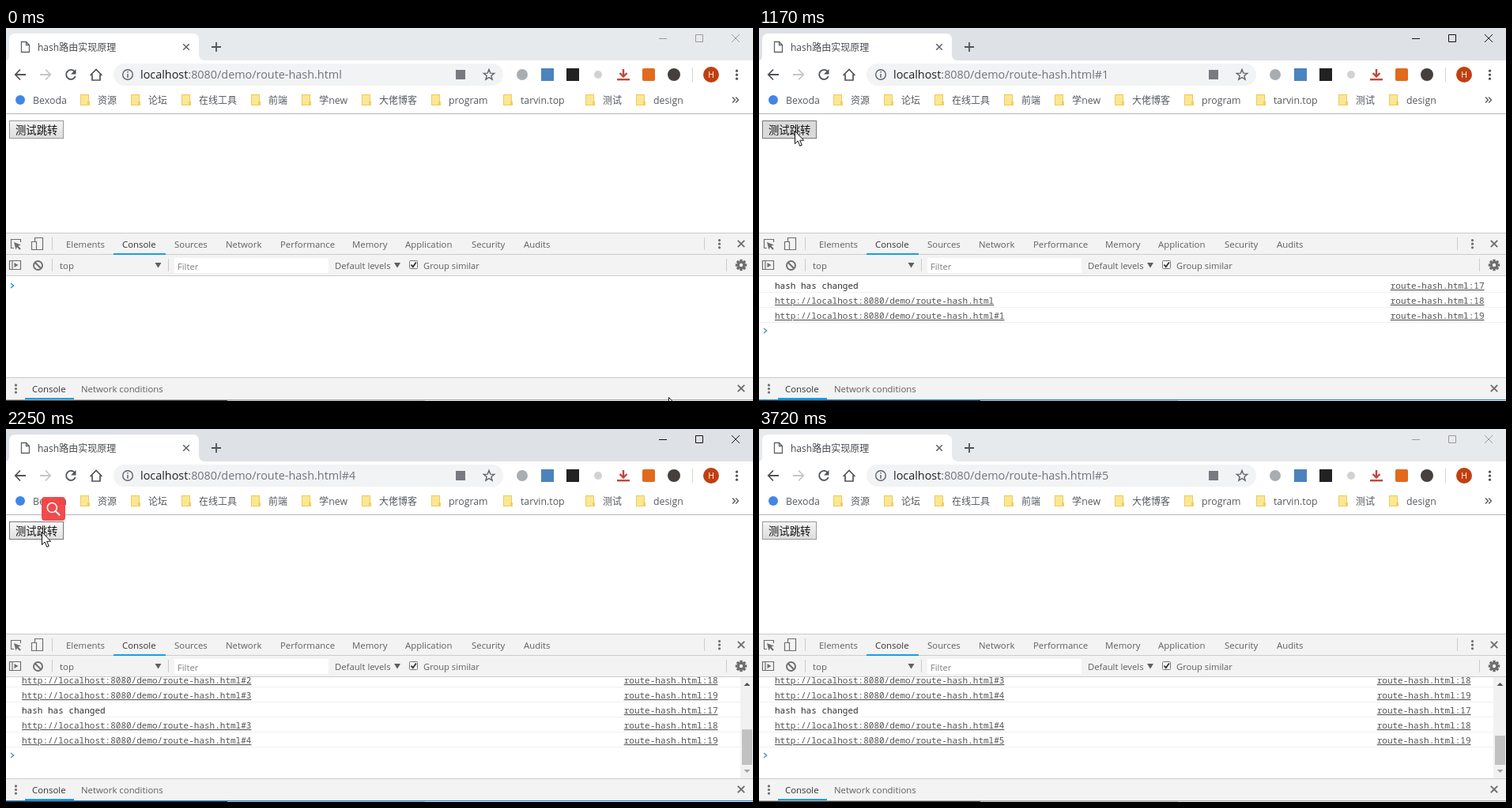
Recreate the animation shown at these times as an HTML page. Size 945 px wide and 472 px high, loop 3800 ms.

```html
<!DOCTYPE html>
<html lang="zh">
<head>
<meta charset="utf-8">
<title>hash</title>
<style>
html, body { margin: 0; width: 100%; height: 100%; overflow: hidden; background: #fff; }
svg { display: block; width: 945px; height: 472px; }
text { font-family: "Open Sans", "Noto Sans CJK SC", "Noto Sans CJK", sans-serif; white-space: pre; }
.log text { font-family: "Noto Sans Mono", "DejaVu Sans Mono", monospace; }
</style>
</head>
<body>
<svg id="stage" viewBox="0 0 945 472"></svg>
<script>
const LOOP = 3800;
const GRAY = '#5f6368';
const TOOL = '#6e6e6e';

const rect = (x, y, w, h, fill, extra = '') =>
  `<rect x="${x}" y="${y}" width="${w}" height="${h}" fill="${fill}" ${extra}/>`;
const circle = (x, y, r, fill, extra = '') =>
  `<circle cx="${x}" cy="${y}" r="${r}" fill="${fill}" ${extra}/>`;
const fillPath = (d, fill, extra = '') => `<path d="${d}" fill="${fill}" ${extra}/>`;
const line = (d, color, width = 1, extra = '') =>
  `<path d="${d}" fill="none" stroke="${color}" stroke-width="${width}" ${extra}/>`;
const label = (x, y, str, size, color, extra = '') =>
  `<text x="${x}" y="${y}" font-size="${size}" fill="${color}" ${extra}>${str}</text>`;
const dots = (x, y, gap, color) =>
  [-gap, 0, gap].map(d => circle(x, y + d, 1.6, color)).join('');
const cross = (x, y, r, color, width) =>
  line(`M${x - r} ${y - r}l${2 * r} ${2 * r}m0 ${-2 * r}l${-2 * r} ${2 * r}`, color, width);

function tabStrip() {
  return rect(0, 0, 945, 41, '#e7eaed', 'id="strip"') +
    fillPath('M0 41Q4 41 4 34V15Q4 7 12 7H236Q244 7 244 15V33Q244 41 252 41Z', '#fff') +
    line('M19.5 17.5H25.5L29.5 21.5V30.5H19.5ZM25.5 17.5V21.5H29.5', GRAY, 1.3) +
    label(40, 28.5, 'hash路由实现原理', 12, '#45494d') +
    cross(228, 24, 3.8, GRAY, 1.5) +
    line('M260 24h12m-6-6v12', '#505458', 1.8) +
    '<g id="controls" fill="none" stroke="#999" stroke-width="1">' +
    '<path d="M826 13.5h10M872.5 8.5h9v9h-9zM918 8l10 10m0-10l-10 10"/></g>';
}

function addressBar() {
  const star = Array.from({ length: 10 }, (_, i) => {
    const r = i % 2 ? 3 : 7, a = i * Math.PI / 5;
    return `${(611 + r * Math.sin(a)).toFixed(1)} ${(59.5 - r * Math.cos(a)).toFixed(1)}`;
  }).join('L');
  const arrow = color => line('M25 59H12.5M18 52.5L11.8 59L18 65.5', color, 1.8);
  return rect(0, 41, 945, 67, '#fff') +
    arrow('#505458') +
    `<g transform="translate(68 0) scale(-1 1)">${arrow('#c4c6c9')}</g>` +
    line('M86.7 55A6 6 0 1 0 87.8 61', '#505458', 1.8) +
    fillPath('M88.5 52V58.5H82Z', '#505458') +
    line('M106.5 60L114 52.5L121.5 60M109 58.5V66H119V58.5', '#505458', 1.7) +
    rect(136, 45, 493, 28, '#f1f3f4', 'rx="14"') +
    circle(154, 59, 6.3, 'none', `stroke="${GRAY}" stroke-width="1.4"`) +
    line('M154 58V62.7M154 55V56.6', GRAY, 1.5) +
    `<text x="170" y="64" font-size="14.4" fill="#202124">localhost<tspan id="path" fill="#70757a"></tspan></text>` +
    rect(569, 53, 12, 12, '#777b80') +
    line(`M${star}Z`, GRAY, 1.4) +
    circle(653, 59, 7, '#a9adb0') +
    rect(677, 51, 16, 16, '#4c83bd') +
    rect(709, 51, 16, 16, '#222') +
    circle(749, 59, 5, '#d2d2d2') +
    line('M781 52V61M776.5 57L781 61.5L785.5 57', '#c2473b', 2.4) +
    rect(773, 64, 16, 2.4, '#c2473b') +
    rect(805, 51, 16, 16, '#e26a1c', 'rx="2"') +
    circle(845, 59, 8, '#45403d') +
    rect(868, 50, 1, 18, '#cfd5dc') +
    circle(892, 59, 10, '#bf4010') +
    label(892, 63, 'H', 10.5, '#fff', 'text-anchor="middle"') +
    dots(924.5, 59.2, 5, '#505458');
}

function bookmarks() {
  const items = [[94, '资源'], [158, '论坛'], [222, '在线工具'], [310, '前端'], [374, '学new'],
    [450, '大佬博客'], [538, 'program'], [629, 'tarvin.top'], [733, '测试'], [797, 'design']];
  const folder = x =>
    rect(x + .5, 84.5, 10, 13, '#fbe793', 'stroke="#eccb5c"') +
    rect(x + 9, 93, 3, 5, '#f0cf62');
  return circle(18, 91, 6, '#4285e8') +
    label(34, 96, 'Bexoda', 12.4, '#55595e') +
    items.map(([x, name]) => folder(x) +
      label(x + 22, 96, name, /[a-z]/.test(name) ? 12.3 : 12, '#55595e')).join('') +
    line('M919 87.5l3.3 3.5l-3.3 3.5m4.2-7l3.3 3.5l-3.3 3.5', GRAY, 1.5) +
    rect(0, 108, 945, 1, '#b6b6b8');
}

function devtools() {
  const tabs = [[76, 'Elements'], [147, 'Console'], [213, 'Sources'], [278, 'Network'], [347, 'Performance'],
    [438, 'Memory'], [505, 'Application'], [589, 'Security'], [655, 'Audits']];
  const tabLabel = (x, y, name) => label(x, y, name, 11.4, name === 'Console' ? '#333' : '#5f5f5f');
  const divider = (x, y) => rect(x, y, 1, 16, '#ccc');
  const drop = x => fillPath(`M${x} 297h8l-4 6.5z`, '#5f5f5f');
  const teeth = Array.from({ length: 8 }, (_, i) =>
    rect(928.3, 292.8, 3.4, 4, TOOL, `transform="rotate(${i * 45} 930 300)"`)).join('');
  return rect(0, 259, 945, 55, '#f3f3f3') + rect(0, 259, 945, 1, '#cacaca') +
    rect(0, 286, 945, 1, '#ccc') + rect(0, 313, 945, 1, '#ccc') +
    line('M10 278.5H6.5V267.5H18.5V271', TOOL, 1.2) +
    fillPath('M10 271l9 3.5-3.5 1.3 3.3 3.4-1.5 1.5-3.3-3.4-1.5 3.2z', TOOL) +
    line('M36.5 270V265.5H46.5V280.5H38M32.5 270.5h6v10h-6z', TOOL, 1.2) +
    divider(58, 265) + divider(883, 265) +
    tabs.map(([x, name]) => tabLabel(x, 278, name)).join('') +
    rect(136, 285, 66, 2, '#1a9fe0') +
    dots(902.5, 273.2, 4.6, TOOL) + cross(930, 273, 4.2, TOOL, 1.9) +
    line('M4.5 294.5h14v11h-14zM8 294.5v11', TOOL, 1.2) + fillPath('M10.5 297v6l5-3z', TOOL) +
    circle(40.5, 300.5, 5.5, 'none', `stroke="${TOOL}" stroke-width="1.9"`) +
    line('M36.5 296.5l8 8', TOOL, 1.9) +
    divider(58, 292) + divider(205, 292) + divider(911, 292) +
    label(68, 305, 'top', 11.4, '#5f5f5f') + drop(188.5) +
    rect(213, 291, 195, 19, '#fff') + label(217, 305.5, 'Filter', 11.2, '#808080') +
    label(416, 305, 'Default levels', 11.3, '#5f5f5f') + drop(491) +
    rect(510.5, 294.5, 10, 10, '#f8f8f8', 'stroke="#777" rx="1"') +
    line('M512.5 299.5l2.3 2.7l4-5.7', '#333', 1.8) +
    label(528, 305, 'Group similar', 11.2, '#5f5f5f') +
    teeth + circle(930, 300, 3.7, 'none', `stroke="${TOOL}" stroke-width="3"`) +
    '<g id="log" class="log" clip-path="url(#view)"></g>' +
    rect(0, 442, 945, 28, '#f3f3f3') + rect(0, 442, 945, 1, '#ccc') +
    dots(12.5, 456.5, 4.6, TOOL) +
    tabLabel(33, 461, 'Console') + tabLabel(95, 461, 'Network conditions') +
    rect(24, 468, 62, 2, '#1a9fe0') + cross(930, 456, 4.2, TOOL, 1.9) +
    rect(0, 470, 945, 1, '#aaa', 'id="edge"') +
    rect(0, 471, 280, 1, '#333') + rect(280, 471, 250, 1, '#bbb') + rect(530, 471, 415, 1, '#e4e4e4');
}

const stage = document.getElementById('stage');
stage.innerHTML = `<defs>
  <clipPath id="view"><rect x="0" y="314" width="945" height="128"/></clipPath>
  <linearGradient id="face" x2="0" y2="1"><stop stop-color="#f4f4f4"/><stop offset="1" stop-color="#dcdcdc"/></linearGradient>
  <linearGradient id="lit" x2="0" y2="1"><stop stop-color="#f8f8f8"/><stop offset="1" stop-color="#e0e0e0"/></linearGradient>
  </defs>` +
  rect(0, 0, 945, 472, '#fff') + tabStrip() + addressBar() + bookmarks() +
  rect(4.5, 117.5, 68, 22, 'url(#face)', 'id="button" stroke="#999"') +
  label(12, 134, '测试跳转', 13.33, '#111') + devtools() +
  '<g id="search">' + rect(45, 86, 30, 30, '#f04043', 'rx="4" opacity=".94"') +
  circle(58.3, 99.5, 6, 'none', 'stroke="#fff" stroke-width="1.6"') +
  line('M62.8 104l5.5 5.5', '#fff', 2) + '</g>' +
  fillPath('M.5.5V16.5L4.2 13L6.8 19.3L9.3 18.2L6.7 12.2H11.7Z', '#fff',
    'id="cursor" stroke="#111" stroke-width="1"');

const ids = ['strip', 'controls', 'path', 'button', 'log', 'edge', 'search', 'cursor'];
const el = Object.fromEntries(ids.map(id => [id, document.getElementById(id)]));

// Pointer stops as [time, x, y]; it jumps from one to the next.
const stops = [[0, 838, 467], [70, 770, 425], [150, 560, 325], [230, 300, 225], [300, 115, 160],
  [380, 49, 137], [450, 46, 132], [530, 45, 130], [2720, 80, 143], [2800, 240, 205],
  [2880, 510, 320], [2950, 745, 420], [3030, 847, 461], [3110, 840, 460], [3190, 833, 465], [3260, 838, 480]];
// Each click as [press, release].
const clicks = [[620, 700], [1170, 1240], [1640, 1720], [2100, 2180], [2570, 2650]];

function drawLog(count) {
  const url = k => 'http://localhost:8080/demo/route-hash.html' + (k ? '#' + k : '');
  const rows = [];
  for (let k = 1; k <= count; k++) rows.push(['hash has changed', 17], [url(k - 1), 18], [url(k), 19]);
  const scrolls = count > 1;
  const shift = scrolls ? 27 + 57 * (count - 2) : 0;
  const right = scrolls ? 900.5 : 917.5;
  const width = scrolls ? 929 : 945;
  let out = rows.map(([str, num], i) => {
    const y = 330 + 19 * i - shift;
    if (y < 300) return '';
    return label(20, y, str, 11, num === 17 ? '#303030' : '#545454', num === 17 ? '' : 'text-decoration="underline"') +
      label(right, y, 'route-hash.html:' + num, 11, '#545454', 'text-anchor="end" text-decoration="underline"') +
      rect(0, y + 4, width, 1, '#f0f0f0');
  }).join('');
  const y = 326 + 19 * rows.length - shift;
  out += line(`M6 ${y - 3}l3.6 3l-3.6 3`, count ? '#5b97d0' : '#3296e8', 1.6);
  if (scrolls) {
    const thumb = 94 * 128 / (128 + shift);
    out += rect(929, 314, 16, 128, '#f1f1f1') + rect(931, 425 - thumb, 13, thumb, '#c1c1c1') +
      fillPath('M933.5 325h8l-4-4z', '#505050') + fillPath('M933.5 431h8l-4 4z', '#a3a3a3');
  }
  el.log.innerHTML = out;
  el.path.textContent = ':8080/demo/route-hash.html' + (count ? '#' + count : '');
}

let shown = -1;
function render(t) {
  const count = clicks.filter(c => t >= c[1]).length;
  if (count !== shown) drawLog(shown = count);

  const active = t >= 620 && t < 3720;
  el.strip.setAttribute('fill', active ? '#dee1e6' : '#e7eaed');
  el.controls.setAttribute('stroke', active ? '#111' : '#999');
  el.edge.setAttribute('fill', active ? '#1883d7' : '#aaa');

  const pressed = clicks.some(([down, up]) => t >= down && t < up);
  const hover = t >= 450 && t < 2720;
  el.button.setAttribute('fill', pressed ? '#dadada' : hover ? 'url(#lit)' : 'url(#face)');
  el.button.setAttribute('stroke', hover ? '#777' : '#999');

  el.search.style.display = t >= 1800 && t < 2800 ? '' : 'none';
  const [, x, y] = stops.filter(s => t >= s[0]).pop();
  el.cursor.setAttribute('transform', `translate(${x} ${y})`);
}

const start = performance.now();
function tick() {
  render((performance.now() - start) % LOOP);
  requestAnimationFrame(tick);
}
tick();
</script>
</body>
</html>
```
